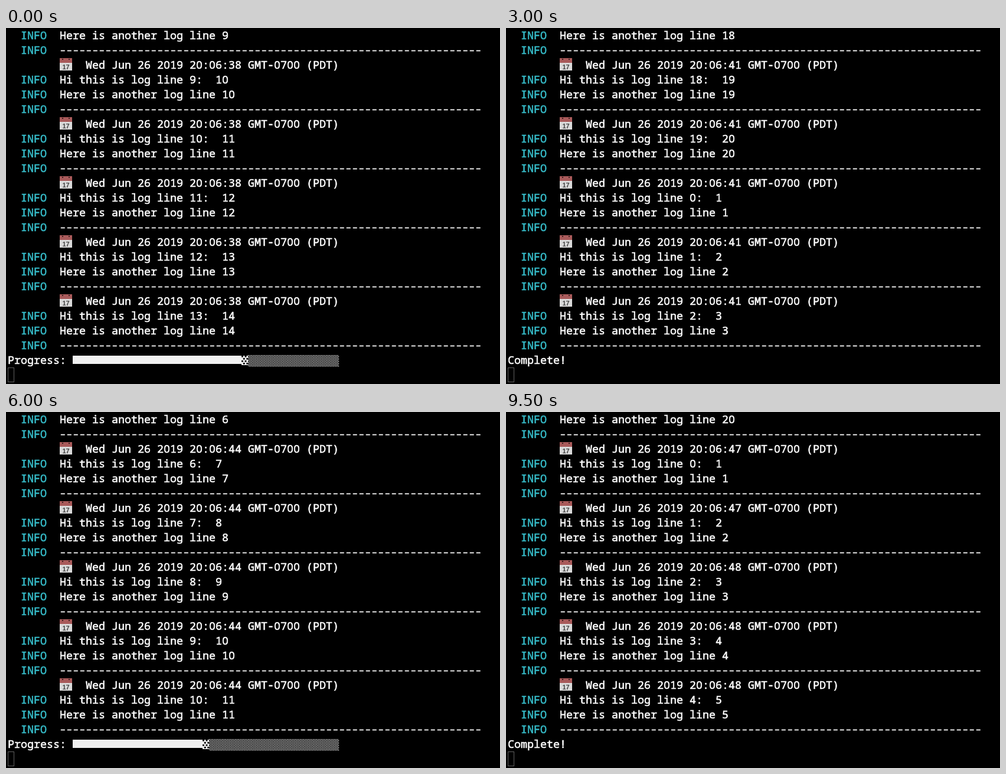
An HTML page with a canvas that plays this animation: 837x603 px, repeating every 9750 ms.

```html
<!DOCTYPE html>
<html lang="en">
<head>
<meta charset="utf-8">
<title>Log with progress bar</title>
<style>
  html, body { margin: 0; width: 100%; height: 100%; overflow: hidden; background: #000; }
  canvas { display: block; }
</style>
</head>
<body>
<canvas id="stage" width="837" height="603"></canvas>
<script>
const ctx = document.getElementById('stage').getContext('2d');

const LOOP = 9750, STEP = 250;
const CELL = 11, ROW = 25, LEFT = 3;
const WHITE = '#fdfdfd', CYAN = '#36bac7';
const MONO = '500 18.33px "Noto Sans Mono", monospace';
const ROUND_ZERO = '500 18.33px "Noto Sans", sans-serif';
const CYCLE = 20, BAR_CELLS = 41, BAR_COL = 10;

// [step, log count]: the logger runs at a slightly uneven pace
const PACE = [[0, 13], [7, 30], [12, 42], [16, 52], [24, 70], [30, 85], [32, 89], [38, 104]];

const colX = col => LEFT + col * CELL;

function rect(x, y, w, h, color) {
  ctx.fillStyle = color;
  ctx.fillRect(x, y, w, h);
}

// Terminal text: one glyph per cell, slightly emboldened, with an undotted zero
function print(text, col, row, color = WHITE) {
  ctx.fillStyle = ctx.strokeStyle = color;
  ctx.lineWidth = 0.6;
  ctx.textAlign = 'center';
  [...text].forEach((ch, i) => {
    if (ch === ' ') return;
    const x = colX(col + i) + CELL / 2, y = row * ROW + 19;
    ctx.font = ch === '0' ? ROUND_ZERO : MONO;
    ctx.fillText(ch, x, y);
    ctx.strokeText(ch, x, y);
  });
}

function info(text, row) {
  print('INFO', 2, row, CYAN);
  print(text, 8, row);
}

function divider(row) {
  print('INFO', 2, row, CYAN);
  for (let i = 0; i < 65; i++) rect(colX(8 + i) + 1.8, row * ROW + 12.6, 7, 1.8, WHITE);
}

function calendar(x, y) {
  rect(x, y + 1, 21, 21, '#dadada');
  rect(x, y + 1, 21, 8, '#a95a5a');
  rect(x + 4, y + 2, 2, 2, '#3a1c1c');
  rect(x + 15, y + 2, 2, 2, '#3a1c1c');
  ctx.fillStyle = '#444';
  ctx.font = 'bold 11px "Liberation Sans", sans-serif';
  ctx.textAlign = 'center';
  ctx.fillText('17', x + 10.5, y + 20);
}

// Staggered dots, spaced by pitch
function shade(x, y, w, h, pitch, color) {
  const rise = pitch * 0.73, rows = Math.round(h / rise);
  for (let row = 0; row < rows; row++)
    for (let dx = row % 2 * pitch / 2; dx < w - 1; dx += pitch)
      rect(x + dx, y + row * rise, pitch * 0.54, rise * 0.65, color);
}

function progress(done) {
  const y = 22 * ROW, head = colX(BAR_COL + done), next = head + CELL;
  print('Progress:', 0, 22);
  rect(colX(BAR_COL), y + 5, head - colX(BAR_COL), 14, '#f0f0f0');
  rect(head, y + 5, CELL, 16, '#f0f0f0');
  shade(head, y + 5, CELL, 16, CELL / 2, '#000');
  shade(next, y + 4, colX(BAR_COL + BAR_CELLS) - next, 20, CELL / 4, WHITE);
}

const lineOf = count => count % CYCLE;
const secondOf = count => Math.floor(38 + (count - 5.4) * 0.104);

function countAt(step) {
  const i = Math.max(1, PACE.findIndex(([s]) => s >= step));
  const [s0, c0] = PACE[i - 1], [s1, c1] = PACE[i];
  return Math.round(c0 + (c1 - c0) * (step - s0) / (s1 - s0));
}

function draw(step) {
  const count = countAt(step);
  rect(0, 0, 837, 603, '#000');

  info(`Here is another log line ${lineOf(count - 5) + 1}`, 0);
  divider(1);
  for (let i = 0; i < 5; i++) {
    const entry = count - 4 + i, line = lineOf(entry), row = 2 + i * 4;
    calendar(colX(8), row * ROW);
    print(`Wed Jun 26 2019 20:06:${secondOf(entry)} GMT-0700 (PDT)`, 12, row);
    info(`Hi this is log line ${line}:  ${line + 1}`, row + 1);
    info(`Here is another log line ${line + 1}`, row + 2);
    divider(row + 3);
  }

  // The finished message stays up for the first lines of the next cycle
  const line = lineOf(count);
  if (line < 5) print('Complete!', 0, 22);
  else progress(line * 2);

  ctx.strokeStyle = '#606060';
  ctx.lineWidth = 1;
  ctx.strokeRect(3.5, 575.5, 10, 24);
}

let shown = -1;
function tick() {
  const step = Math.floor(performance.now() % LOOP / STEP);
  if (step !== shown) draw(shown = step);
  requestAnimationFrame(tick);
}
tick();
</script>
</body>
</html>
```
